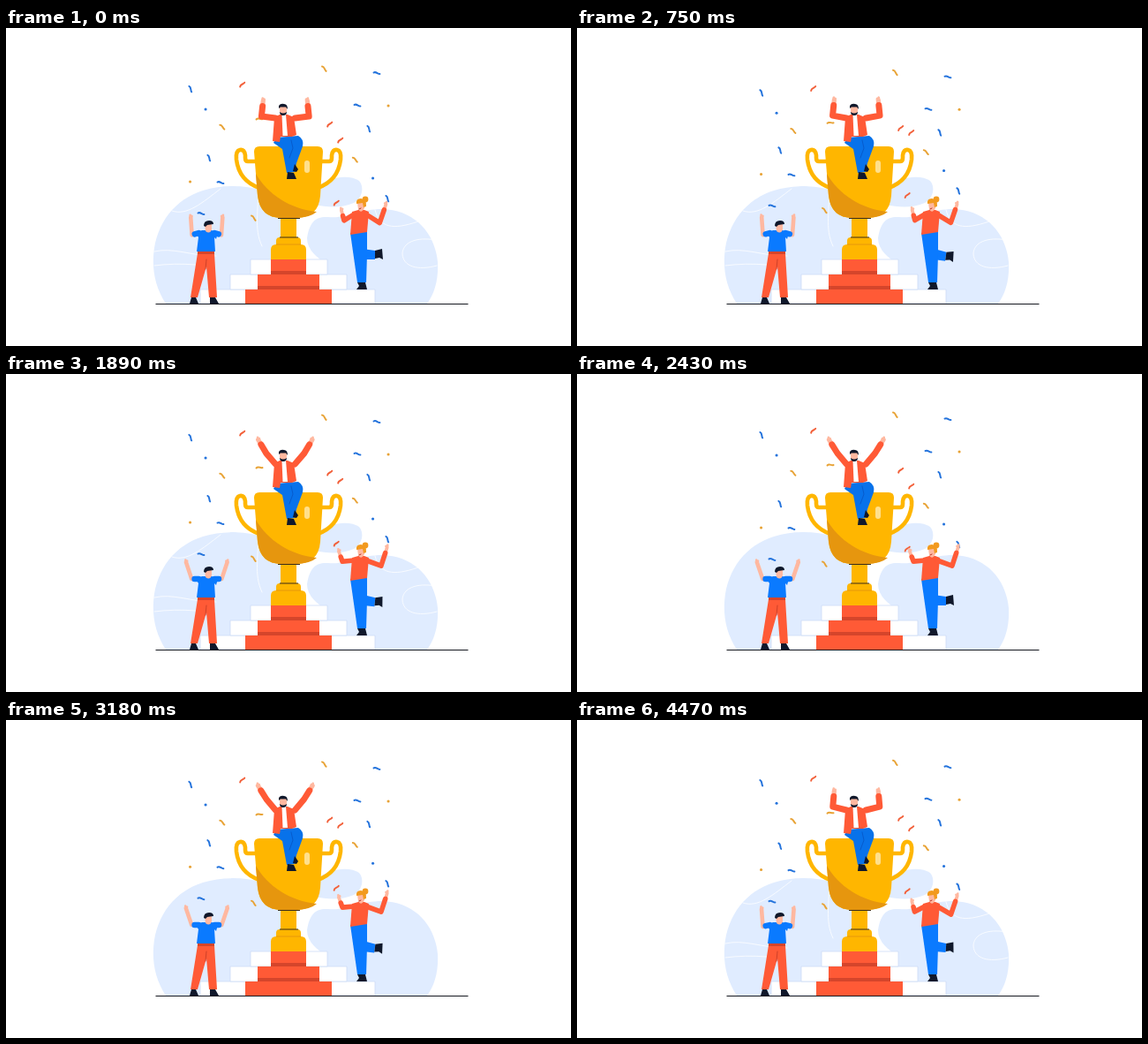
An HTML page that plays this animation: 640 by 360 pixels, repeating every 4500 ms.

```html
<!DOCTYPE html>
<html lang="en">
<head>
<meta charset="utf-8">
<title>Trophy celebration</title>
<style>
  html, body { margin: 0; width: 100%; height: 100%; overflow: hidden; background: #fff; }
  svg { display: block; width: 100vw; height: 100vh; }
  .gold { fill: #ffb600; } .red { fill: #ff5a36; } .blue { fill: #0a7aff; }
  .dark { fill: #10182b; } .skin { fill: #ffb8a0; } .deep { fill: #d5452b; }
  .line { fill: none; stroke-linecap: round; stroke-linejoin: round; }
</style>
</head>
<body>
<svg viewBox="0 0 640 360">
  <!-- backdrop -->
  <g fill="#e0ecff">
    <path d="M181 312C170 295 166 277 167 259C169 222 191 194 223 184C246 177 270 178 291 184L320 210V312Z"/>
    <path d="M356 312V262Q341 251 341 238C344 219 351 213 365 214C387 216 400 205 426 205C463 206 486 232 489 265C490 284 486 300 477 312Z"/>
    <path d="M352 180C368 167 390 166 400 173C406 180 404 192 394 198C380 204 364 203 350 200Z"/>
  </g>
  <g id="contours" class="line" stroke="#fff" stroke-width=".9">
    <path d="M168 253C190 248 208 258 238 258M168 269Q190 266 215 268M188 207C205 213 222 198 243 182M285 183C287 205 280 226 290 247"/>
    <path d="M487 240C464 236 449 243 449 256C450 270 466 275 488 269M418 206C424 230 444 227 470 218"/>
  </g>

  <!-- podium -->
  <g fill="#fff" stroke="#cddcf6" stroke-width=".8">
    <path d="M220 296H418V312H220Z"/><path d="M254 279H386V296H254Z"/><path d="M277 262H364V279H277Z"/>
  </g>
  <path class="red" d="M300 262H340V279H355V296H369V312H271V296H285V279H300Z"/>
  <path class="deep" d="M300 275H340V279H300ZM285 292H355V296H285Z"/>
  <path d="M169.5 312.5H523.5" stroke="#15181f"/>
  <g id="confetti" class="line"></g>

  <!-- trophy -->
  <g class="line" stroke="#ffb600" stroke-width="4.6">
    <path id="handle" d="M284 151H274Q271 151 271 147V144Q270 137 265 138Q260 139 261 149Q264 173 287 181"/>
    <use href="#handle" transform="matrix(-1 0 0 1 640 0)"/>
  </g>
  <path class="gold" d="M300 262V251Q300 245 306 245H334Q340 245 340 251V262ZM306 245V241Q306 237 310 237H330Q334 237 334 241V245ZM311 215H329V237H311Z"/>
  <path d="M306 245H334" stroke="#e6980d"/>
  <path class="gold" d="M287 134H353Q359 134 359 140L356 190Q354 215 328 215H312Q288 215 285 190L281 140Q281 134 287 134Z"/>
  <path fill="#e6960e" d="M283 165C296 188 322 205 352 208Q344 215 328 215H312Q288 215 285 190Z"/>
  <path d="M308 215.5H333M310 237H331" stroke="#3b2c17" stroke-width="1.1"/>
  <rect x="338" y="150" width="6" height="14" rx="3" fill="#ffe08c"/>

  <!-- man on the trophy -->
  <g>
    <path fill="#0872ea" d="M303 130L306 124L331 122Q338 126 336 134L329 153L327 163L318 164L313 137Z"/>
    <path d="M323 127L325 136L321 147" class="line" stroke="#0758c9" stroke-width=".9"/>
    <path class="dark" d="M319 163L326 164L329 171L318 171ZM327 154L331 160L329 163L325 162Z"/>
    <path class="red" d="M304 101L310 98H319L326 101L329 121L324 123H311L310 129L302 128Z"/>
    <path fill="#fff" d="M312.5 98H317L319 122H313.5Z"/>
    <path class="skin" d="M310 89H318V95Q314 101 310 95Z"/>
    <path class="dark" d="M310 95Q314 98 318 95Q318 99 314 99Q310 99 310 95ZM309 91V88Q311 85 315 86Q319 86 319 92L317 89.5H311Z"/>
  </g>

  <!-- man with cap -->
  <g>
    <path class="red" d="M217 255H236L239 305H230L227 270L217 305H209Z"/>
    <path d="M227 262L226 273" class="line" stroke="#c83e28" stroke-width=".9"/>
    <path class="deep" d="M217 253H236V256H217Z"/>
    <path class="dark" d="M210 305H215L218 312H208ZM231 305H237L241 312H231Z"/>
    <path class="blue" d="M215 232L222 229H233L240 232L238 239L236 237L237 253H216L218 237Z"/>
    <path class="skin" d="M225 222H233V228Q231 234 226 230Z"/>
    <path class="dark" d="M224 224Q224 218 230 218Q235 218 235 222L228 223L226 225Z"/>
  </g>

  <!-- woman -->
  <g>
    <g id="kick">
      <path class="blue" d="M404 250L418 252V262H403Z"/>
      <path class="dark" d="M418 252L426 250L427 262L423 260L418 261Z"/>
    </g>
    <path class="blue" d="M390 232L409 230V257L408 288H398Z"/>
    <path class="dark" d="M398 288H407L409 296H397L400 292Z"/>
    <path class="red" d="M392 208L399 206H406L411 208L409 231L390 234Z"/>
    <path class="skin" d="M398 198H406V204Q402 211 399 205Z"/>
    <g fill="#f29a1f"><path d="M397 199Q396 193 402 193Q409 194 408 202L405 203L404 198Z"/><circle cx="407" cy="194" r="3.4"/></g>
    <path d="M400 205L402 204" class="line" stroke="#b73326"/>
  </g>
  <g id="arms" class="line"></g>
</svg>
<script>
const LOOP = 4500, BOB = 2480;
const RED = '#ff5a36', BLUE = '#0a7aff', SKIN = '#ffb8a0';
const $ = id => document.getElementById(id);
const wave = t => (1 - Math.cos(2 * Math.PI * t / BOB)) / 2;
const mix = (a, b, u) => a + (b - a) * u;
const smooth = u => (u = Math.min(1, Math.max(0, u)), u * u * (3 - 2 * u));

function add(parent, attrs) {
  const el = document.createElementNS('http://www.w3.org/2000/svg', 'path');
  for (const k in attrs) el.setAttribute(k, attrs[k]);
  return parent.appendChild(el);
}

// Arms: a bone is { length, low, high } with angles in degrees, as seen on the right side
const bone = (length, low, high) => ({ length, low, high });
function arm(x, y, side, upper, fore, color, width, cuff) {
  const stroke = (c, w) => add($('arms'), { stroke: c, 'stroke-width': w });
  return { x, y, side, upper, fore, cuff,
           skin: stroke(SKIN, width - 1.8), sleeve: stroke(color, width), fingers: stroke(SKIN, 2.6) };
}
const arms = [
  ...[-1, 1].flatMap(side => [
    arm(316.3 + 11 * side, 102, side, bone(16, -7, -50), bone(18, -96, -58), RED, 7, 1.65),
    arm(227.3 + 9 * side, 232, side, bone(8, 17, 0), bone(20, -86, -71), BLUE, 6.4, .6)
  ]),
  arm(394, 211, -1, bone(13, 32, 5), bone(12, -75, -70), RED, 5.6, 1.45),
  arm(408, 211, 1, bone(18, 32, 20), bone(22, -71, -72), RED, 5.6, 1.7)
];

// The cuff counts bones from the shoulder: 1 is the elbow, 2 the wrist
function drawArm(a, raise) {
  const tip = ([x, y], b, u, part = 1) => {
    const angle = mix(b.low, b.high, u) * Math.PI / 180;
    return [x + a.side * part * b.length * Math.cos(angle), y + part * b.length * Math.sin(angle)];
  };
  const shoulder = [a.x, a.y], lag = raise ** 2;
  const elbow = tip(shoulder, a.upper, raise);
  const hand = tip(elbow, a.fore, lag);
  const sleeve = a.cuff < 1
    ? [shoulder, tip(shoulder, a.upper, raise, a.cuff)]
    : [shoulder, elbow, tip(elbow, a.fore, lag, a.cuff - 1)];
  a.skin.setAttribute('d', 'M' + [shoulder, elbow, hand].join('L'));
  a.sleeve.setAttribute('d', 'M' + sleeve.join('L'));
  a.fingers.setAttribute('d', `M${hand}l${a.side * .6} -2.6M${hand}l${-a.side * 1.3} -1.4`);
}

// Confetti: low pieces rise while the others sink
const confetti = [];
function piece(x, y, tilt, size, stroke) {
  const d = size ? `M${-size} 0C${-size / 3} -2 ${size / 3} 1 ${size} .5` : 'M0 0h.1';
  const el = add($('confetti'), { stroke, d, 'stroke-width': size ? 2 : 3 });
  confetti.push({ el, x, y, tilt, travel: y > 120 ? -13 : 6.5 });
}
const ribbons = [
  { color: '#2473dc', tilts: [62, 8], at: [[209, 69], [420, 51], [411, 114], [398, 87.5], [230, 147], [243, 175], [432, 193], [221, 210]] },
  { color: '#f2603a', tilts: [-48], at: [[267.5, 64], [366.5, 109], [378.5, 127], [374, 198]] },
  { color: '#e8a336', tilts: [45, 40], at: [[360.5, 46], [245, 112], [280.5, 215], [395.5, 149]] }
];
for (const { color, tilts, at } of ribbons)
  at.forEach(([x, y], i) => piece(x, y, tilts[i % tilts.length], 3.5, color));
piece(287, 103, -8, 3.5, '#e8a336');
[[226, 92], [208.5, 174]].forEach(([x, y], i) => {
  const colors = ['#2473dc', '#e8a336'];
  piece(x, y, 0, 0, colors[i]);
  piece(x + 207, y - 4, 0, 0, colors[1 - i]);
});

function draw(t) {
  const bob = wave(t);
  const raise = smooth((t - 500) / 1500) * smooth((4700 - t) / 900);
  for (const { el, x, y, tilt, travel } of confetti)
    el.setAttribute('transform', `translate(${x} ${y + bob * travel}) rotate(${tilt})`);
  for (const a of arms) drawArm(a, raise);
  $('kick').setAttribute('transform', `rotate(${bob * 12} 405 256)`);
  $('contours').setAttribute('opacity', (t + 100) % LOOP < LOOP / 2 ? .85 : 0);
}

function tick() {
  draw(performance.now() % LOOP);
  requestAnimationFrame(tick);
}
tick();
</script>
</body>
</html>
```
